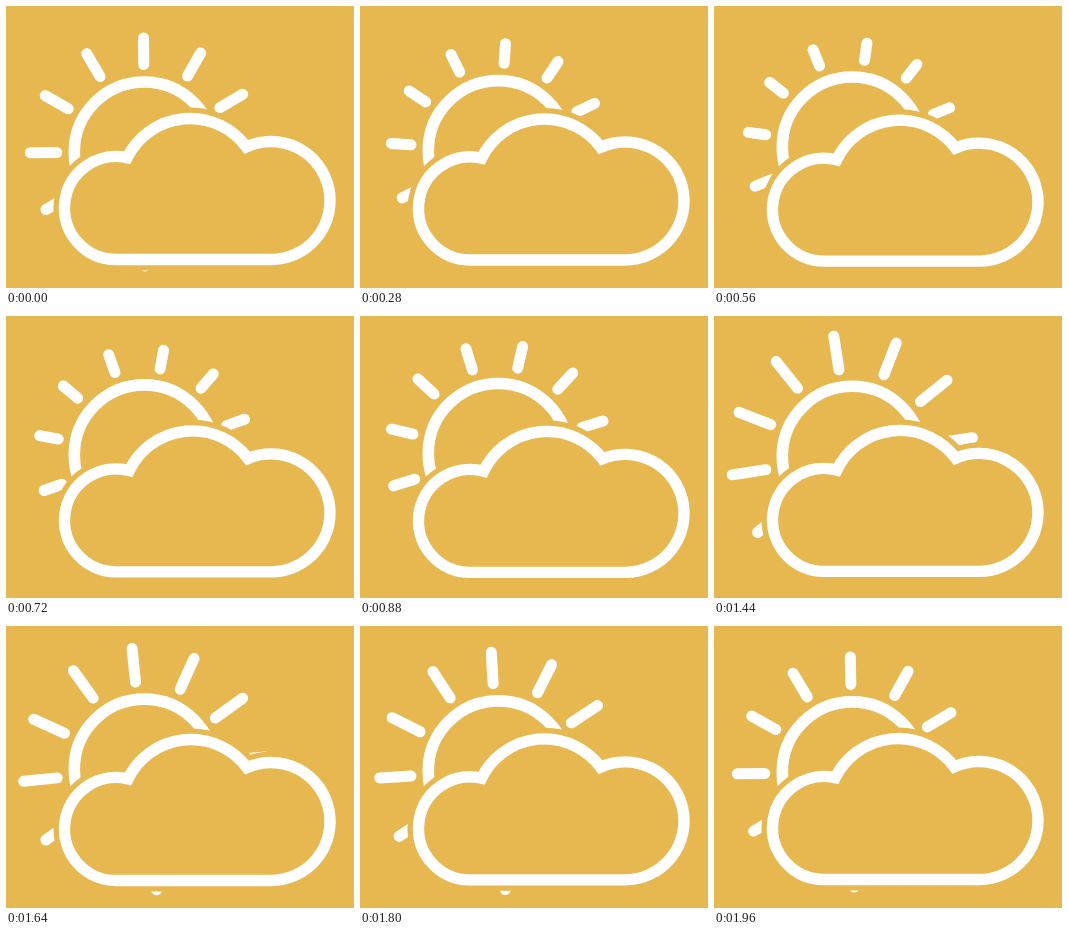
An HTML page for the animation above (2 s loop, 348x282 px).

```html
<!DOCTYPE html>
<html lang="en">
<head>
<meta charset="utf-8">
<title>Sun behind cloud</title>
<style>
  html, body { margin: 0; width: 100%; height: 100%; overflow: hidden; background: #e7b850; }
  svg { display: block; width: 100vw; height: 100vh; }
</style>
</head>
<body>
<svg viewBox="0 0 348 282" fill="none" stroke="#fff">
  <rect width="348" height="282" fill="#e7b850" stroke="none"/>
  <circle id="disc" r="70" stroke-width="11.6"/>
  <path id="rays" stroke-width="11" stroke-linecap="round"/>
  <path id="gap" fill="#e7b850" stroke="#e7b850" stroke-width="22"/>
  <path id="cloud" stroke-width="11.4"/>
</svg>
<script>
const LOOP = 2000, STEP = 40, LAG = 25;
const SUN_X = 138.3, RAY_COUNT = 12, RAY_INNER = 87.5;
const el = id => document.getElementById(id);
const point = (x, y) => `${x.toFixed(2)} ${y.toFixed(2)}`;

// Upper crossing of two circles, a lying left of b.
function crossing(a, b) {
  const dx = b.x - a.x, dy = b.y - a.y, d = Math.hypot(dx, dy);
  const along = (d * d + a.r * a.r - b.r * b.r) / (2 * d);
  const up = Math.sqrt(a.r * a.r - along * along);
  return point(a.x + (along * dx + up * dy) / d, a.y + (along * dy - up * dx) / d);
}

function cloudPath(shift) {
  const left = { x: 110, y: 202 + shift, r: 51.5 };
  const middle = { x: 184 + shift, y: 182.5 + shift, r: 70 };
  const right = { x: 265, y: 194.5 + shift, r: 59 };
  const base = left.y + left.r;
  const arc = (c, large, end) => `A${c.r} ${c.r} 0 ${large} 1 ${end}`;
  return `M${point(left.x, base)}` +
    arc(left, 1, crossing(left, middle)) +
    arc(middle, 0, crossing(middle, right)) +
    arc(right, 1, point(right.x, base)) + 'Z';
}

function rayPath(cy, turn, outer) {
  let d = '';
  for (let i = 0; i < RAY_COUNT; i++) {
    const a = (i + turn) * 2 * Math.PI / RAY_COUNT;
    const at = r => point(SUN_X + r * Math.sin(a), cy - r * Math.cos(a));
    d += `M${at(RAY_INNER)}L${at(outer)}`;
  }
  return d;
}

function draw(time) {
  const turn = (Math.floor(time % LOOP / STEP) * STEP - LAG) / LOOP;
  const wave = Math.cos(turn * 2 * Math.PI);
  const sunY = 141.5 + 4.5 * wave;
  el('disc').setAttribute('cx', SUN_X);
  el('disc').setAttribute('cy', sunY);
  el('rays').setAttribute('d', rayPath(sunY, turn, 113.3 - 8.5 * Math.sin(turn * 2 * Math.PI)));
  const outline = cloudPath(1.5 * (1 - wave));
  el('gap').setAttribute('d', outline);
  el('cloud').setAttribute('d', outline);
}

const start = performance.now();
function tick() {
  draw(performance.now() - start);
  requestAnimationFrame(tick);
}
tick();
</script>
</body>
</html>
```
